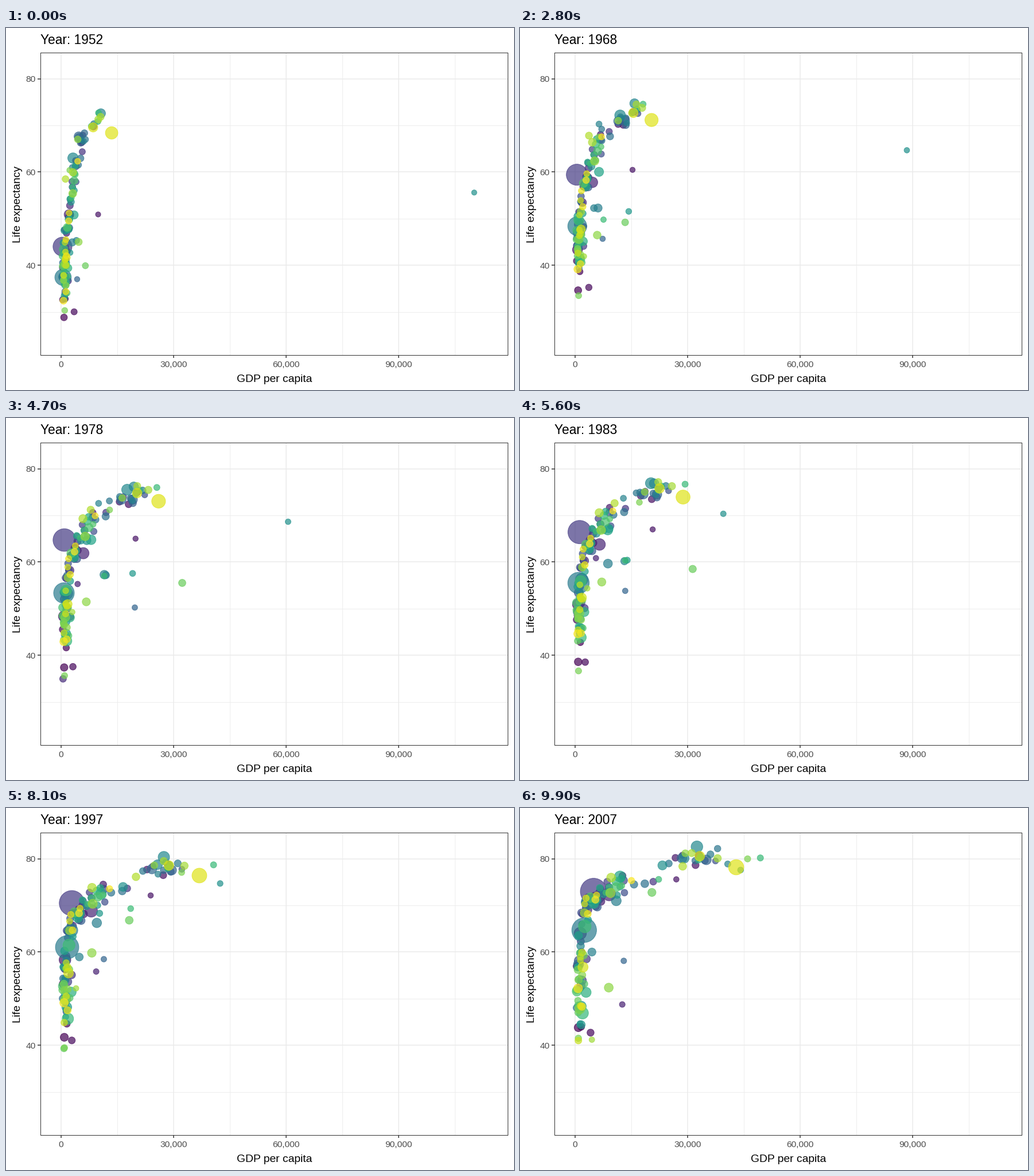
Animation of 885 by 632 pixels, one loop 10000 ms. Source, as a matplotlib script:

```python
import numpy as np
import matplotlib.pyplot as plt
from matplotlib.animation import FuncAnimation

W, H, DPI = 885, 632, 64
FRAMES, START, SPAN = 100, 1952, 55
LEFT, TOP, RIGHT, BOTTOM = 60, 43, 874, 571
COUNT, MAX_POP = 142, 1319
PT = 72 / DPI  # points per pixel
GRID, DARK, TICK = "#EBEBEB", "#333333", "#4D4D4D"
plt.rcParams["font.family"] = "Liberation Sans"

rng = np.random.default_rng(11)
time = np.linspace(0, 1, FRAMES)
survey = np.linspace(0, 1, 12)  # one reading every five years
tracks = {}


def px(gdp):
    """Thousands per capita to pixels."""
    return 95.8 + 6.537 * np.asarray(gdp)


def py(life):
    return 88.8 + 8.134 * (80 - np.asarray(life))


def rise(a, b, power=1.0):
    """Growth over the surveys; a power below 1 gains early, above 1 late."""
    return a + (b - a) * survey ** power


def bump(height, center, width=0.15):
    """A passing boom or, with negative height, a crisis."""
    return height * np.exp(-((survey - center) / width) ** 2)


def bubble(rank, pop0, pop1, gdp, life):
    """Rank sets colour and stacking; the dot moves straight between surveys."""
    size = 2 + 10 * np.sqrt(rise(pop0, pop1, 1.1) / MAX_POP)
    radius = 0.6585 * (2.845 * size + 0.94)
    tracks[rank] = [np.interp(time, survey, v) for v in (px(gdp), py(life), radius)]


# Giants
bubble(24, 556, 1319, rise(.4, 4.96, 3), rise(44, 73, .45) + bump(-12, .18, .06))
bubble(58, 372, 1110, rise(.55, 2.45, 2.8), rise(37.4, 64.7, .72))
bubble(134, 158, 301, rise(13.5, 42.95, 1.15), rise(68.4, 78.2))
bubble(59, 82, 224, rise(.75, 3.5, 1.7), rise(37.5, 70.7))
bubble(14, 57, 190, rise(2.1, 9.1, .8), rise(50.9, 72.4, .9))
bubble(97, 41, 169, rise(.7, 2.6, 1.4), rise(43.4, 65.5))
bubble(8, 47, 150, rise(.65, 1.4, 3), rise(37.5, 64, 1.2))
bubble(94, 33, 135, rise(1.1, 2), rise(36.3, 46.9, .6))
bubble(82, 30, 109, rise(3.5, 12, .85), rise(50.8, 76.2, .8))
bubble(66, 86, 127, rise(3.2, 32.5, .95), rise(63, 82.6, .6))

# Oil booms
spike = rise(108.4, 45, .8) + bump(46, .36, .07) + bump(-32, .62, .2)
bubble(71, .2, 2.5, spike + bump(9, .09, .07) + bump(-10, .26, .06), rise(55.6, 77.6, .7))
bubble(109, 4, 27.6, rise(6.5, 20.5) + bump(21, .5), rise(39.9, 72.8))
bubble(75, 1, 6, rise(2.4, 12) + bump(15, .4, .17), rise(42.7, 74))
bubble(45, .4, 1.5, rise(4.3, 13) + bump(13, .46, .09), rise(37, 58, .7) + bump(6, .7))
bubble(7, .1, .7, rise(9.9, 27) + bump(2, .45), rise(50.9, 75.6, .75))
bubble(96, .5, 3.2, rise(1.8, 22.3), rise(37.6, 75.6, .9))
bubble(61, 5.4, 27.5, rise(4.1, 4.5) + bump(9.5, .54, .16), rise(45.3, 60, .6) + bump(5, .6))
bubble(60, 17, 69, rise(3, 11) + bump(6, .43, .1), rise(44.9, 71))

# Crises and epidemics
bubble(107, 2.5, 8.9, rise(.5, .85), rise(40, 47) + bump(-22, .735, .075))
bubble(18, 4.7, 14, rise(.4, 1.7, 3), rise(39.4, 60) + bump(-18, .44, .08))
bubble(117, 14, 44, rise(4.7, 9), rise(45, 48) + bump(14, .73, .25))
bubble(13, .4, 1.6, rise(.85, 12.6, 1.6), rise(47.6, 48) + bump(16, .65, .2))
bubble(121, .3, 1.1, rise(1.2, 4.5, .8), rise(41.4, 37.5) + bump(19, .68, .25))
bubble(3, 4.2, 12.4, rise(3.5, 4.6) + bump(-1.9, .7, .25), rise(30, 42.7, .7))
bubble(112, 2.1, 6.1, rise(1, .9), rise(30.3, 41.5))
bubble(0, 8.4, 31.9, rise(.8, .9), rise(28.8, 43.8, .75))

# Late risers
bubble(113, 1.1, 4.6, rise(2.3, 46, 1.9), rise(60.4, 80, .8))
bubble(55, 2.1, 7, rise(3, 38, 1.7), rise(61, 82.2, .75))
bubble(62, 3, 4.1, rise(5.2, 40.7, 2.7), rise(66.9, 78.9))
bubble(70, 21, 49, rise(1, 23.3, 1.8), rise(47.5, 78.6, .8))
bubble(125, 8.5, 23, rise(1.2, 28.7, 1.9), rise(58.5, 78.4, .6))
bubble(95, 3.3, 4.6, rise(10, 49.4, 1.25), rise(72.7, 80.2, 1.1))

# Wealthy front: higher incomes start out with longer lives
LARGE = (44, 47, 64, 133)
SMALL = (5, 6, 9, 20, 34, 43, 49, 57, 63, 90, 91, 118, 122, 123)
for rank in LARGE + SMALL:
    first = rng.uniform(3.8, 11)
    last = np.clip(26 + .9 * first + rng.normal(0, 3.5), 25, 38)
    life = rise(63 + .8 * first + rng.normal(0, .7), rng.normal(80.2, .8))
    pop = 52 if rank in LARGE else rng.uniform(2, 15)
    bubble(rank, pop, 1.25 * pop, rise(first, last), life)

rest = rng.permutation(sorted(set(range(COUNT)) - set(tracks)))

# Poorest column: quick gains, then setbacks for the unlucky
for rank in rest[:43]:
    wealth, luck = rng.normal(size=2)
    first = np.clip(rng.normal(38.7, 4), 31, 48)
    last = np.clip(first + 19 + 3 * luck, 50, 66)
    life = rise(first, last, .85) + rise(0, min(0, 7 * luck), 4)
    gdp = rise(np.clip(.9 * np.exp(.45 * wealth), .35, 3),
               np.clip(1.2 * np.exp(.55 * wealth), .35, 4))
    pop = np.clip(3.5 * np.exp(.9 * rng.normal()), .1, 21)
    bubble(rank, pop, 3.6 * pop, gdp, np.maximum(life, 41 * survey))

# Developing crowd: life and income rise together
for rank in rest[43:]:
    wealth, luck = rng.normal(size=2)
    first = np.clip(53 + 7 * wealth + 2 * luck, 40, 67)
    last = np.clip(72.5 + 2 * wealth + 1.5 * luck, 65, 79)
    gdp = rise(np.clip(2.5 * np.exp(.45 * wealth), .8, 6.5),
               np.clip(7 * np.exp(.6 * wealth), 1.6, 25), rng.uniform(.8, 1.2))
    pop = np.clip(5 * np.exp(.9 * rng.normal()), .3, 26)
    bubble(rank, pop, 2.4 * pop, gdp, rise(first, last, .72))

xs, ys, radii = np.array([tracks[r] for r in range(COUNT)]).transpose(1, 2, 0)
colors = plt.get_cmap("viridis")(np.linspace(0, 1, COUNT))
colors[:, 3] = 0.7

fig = plt.figure(figsize=(W / DPI, H / DPI), dpi=DPI, facecolor="white")
ax = fig.add_axes([0, 0, 1, 1])
ax.set(xlim=(0, W), ylim=(H, 0))
ax.axis("off")


def line(x, y, width, color=DARK, z=0):
    ax.plot(x, y, color=color, lw=width * PT, zorder=z, solid_capstyle="butt")


def label(x, y, text, size, color="black", **style):
    return ax.text(x, y, text, fontsize=size * PT, color=color, va="baseline", **style)


for k in range(8):
    major = k % 2 == 0
    x = px(15 * k)
    line([x, x], [TOP, BOTTOM], 1.5 if major else 0.9, GRID)
    if major:
        line([x, x], [BOTTOM, BOTTOM + 5], 1.5)
        label(x, 592.5, f"{15000 * k:,}", 15.45, TICK, ha="center")
for age in range(30, 90, 10):
    major = age % 20 == 0
    y = py(age)
    line([LEFT, RIGHT], [y, y], 1.5 if major else 0.9, GRID)
    if major:
        line([LEFT - 5, LEFT], [y, y], 1.5)
        label(51.5, y + 5.7, str(age), 15.45, TICK, ha="right")
line([LEFT, RIGHT, RIGHT, LEFT, LEFT], [TOP, TOP, BOTTOM, BOTTOM, TOP], 1, z=5)

label(467.5, 618, "GDP per capita", 19.3, ha="center")
label(25, 307.5, "Life expectancy", 19.3, ha="center", rotation=90, rotation_mode="anchor")
title = label(60, 28, "", 22.8)
dots = ax.scatter(xs[0], ys[0], c=colors, edgecolors="face", linewidths=PT, zorder=3)


def draw(i):
    dots.set_offsets(np.column_stack([xs[i], ys[i]]))
    dots.set_sizes((2 * radii[i] * PT) ** 2)
    title.set_text(f"Year: {round(START + SPAN * time[i])}")
    return dots, title


anim = FuncAnimation(fig, draw, frames=FRAMES, interval=100, repeat=True)
plt.show()
```
